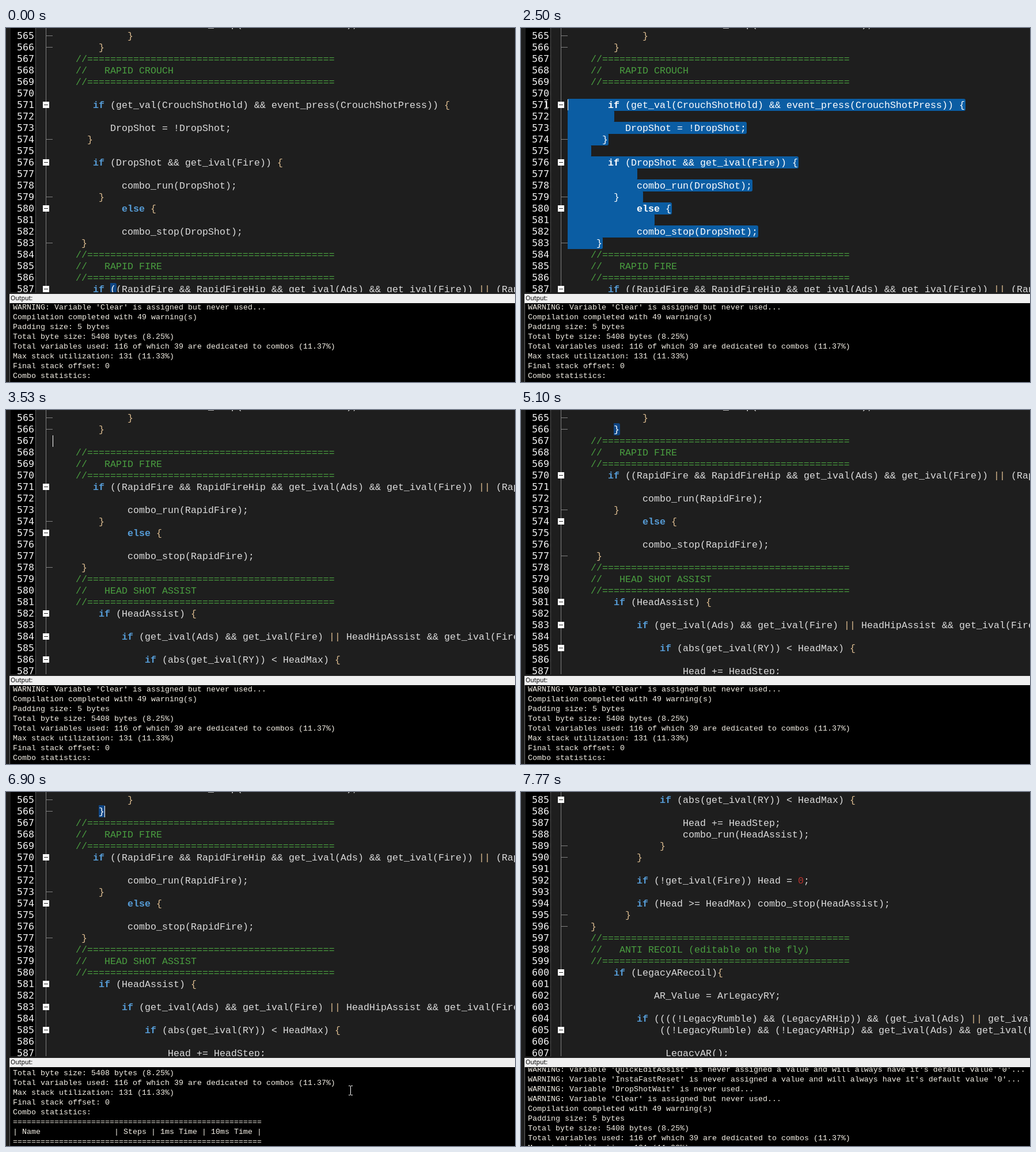
An HTML page with a canvas for the animation above (8000 ms loop, 884 by 615 pixels).

```html
<!DOCTYPE html>
<html lang="en">
<head>
<meta charset="utf-8">
<title>Code editor</title>
<style>
html, body { margin: 0; width: 100%; height: 100%; overflow: hidden; background: #1e1e1e; }
canvas { display: block; }
</style>
</head>
<body>
<canvas id="stage" width="884" height="615"></canvas>
<script>
const ctx = document.getElementById('stage').getContext('2d');
const LOOP = 8000, LEFT = 81, CHAR = 10, ROW = 20, FIRST = 564;
const CODE_FONT = '16.66px "Liberation Mono", monospace';
const RULE = '4 //' + '='.repeat(43);

// Each row: indent, then text.
const source = `22 combo_stop(HeadAssistFireMode);
13 }
8 }
${RULE}
4 //   RAPID CROUCH
${RULE}
0
7 if (get_val(CrouchShotHold) && event_press(CrouchShotPress)) {
8
10 DropShot = !DropShot;
6 }
4
7 if (DropShot && get_ival(Fire)) {
12
12 combo_run(DropShot);
8 }    
12 else {
15
12 combo_stop(DropShot);
5 }
${RULE}
4 //   RAPID FIRE
${RULE}
7 if ((RapidFire && RapidFireHip && get_ival(Ads) && get_ival(Fire)) || (RapidFire
0
13 combo_run(RapidFire);
8 }
13 else {
0
13 combo_stop(RapidFire);
5 }
${RULE}
4 //   HEAD SHOT ASSIST
${RULE}
8 if (HeadAssist) {
0
12 if (get_ival(Ads) && get_ival(Fire) || HeadHipAssist && get_ival(Fire)) {
0
16 if (abs(get_ival(RY)) < HeadMax) {
0
20 Head += HeadStep;
20 combo_run(HeadAssist);
16 }
12 }
0
12 if (!get_ival(Fire)) Head = 0;
0
12 if (Head >= HeadMax) combo_stop(HeadAssist);
10 }
4 }
${RULE}
4 //   ANTI RECOIL (editable on the fly)
${RULE}
8 if (LegacyARecoil){
0
15 AR_Value = ArLegacyRY;
0
12 if ((((!LegacyRumble) && (LegacyARHip)) && (get_ival(Ads) || get_ival(Fire))) ||
16 ((!LegacyRumble) && (!LegacyARHip) && get_ival(Ads) && get_ival(Fire))) {
0
17 LegacyAR();`;

const parseRow = line => {
  const [, indent, text] = line.match(/^(\d+) ?(.*)$/);
  return ' '.repeat(+indent) + text;
};
const before = source.split('\n').map(parseRow);
const cleared = [...before.slice(0, 3), '', ...before.slice(20)];
const joined = [...before.slice(0, 3), ...before.slice(20)];
// Rows that open a fold although their brace lies past the right edge
const opensFold = row => /\{$|\(RapidFire$/.test(row);

const output = [
  "WARNING: Variable 'QuickEditAssist' is never assigned a value and will always have it's default value '0'...",
  "WARNING: Variable 'InstaFastReset' is never assigned a value and will always have it's default value '0'...",
  "WARNING: Variable 'DropShotWait' is never used...",
  "WARNING: Variable 'Clear' is assigned but never used...",
  'Compilation completed with 49 warning(s)',
  'Padding size: 5 bytes',
  'Total byte size: 5408 bytes (8.25%)',
  'Total variables used: 116 of which 39 are dedicated to combos (11.37%)',
  'Max stack utilization: 131 (11.33%)',
  'Final stack offset: 0',
  'Combo statistics:',
  '='.repeat(54),
  '| Name'.padEnd(22) + '| Steps | 1ms Time | 10ms Time |',
  '='.repeat(54)
];

// Value of the last [time, value] step reached
const stepAt = (steps, t) => steps.reduce((value, [at, next]) => t >= at ? next : value, steps[0][1]);

const editorScroll = [[0, 0], [7170, 3], [7230, 6], [7300, 9], [7370, 12], [7700, 15], [7735, 18], [7765, 20]];
const outputScroll = [[0, 0], [5795, 24], [5828, 48], [6970, 0], [7030, -48]];
const caretShown = [[0, 0], [1640, 1], [3200, 0], [3528, 1], [4230, 0], [4770, 1], [5098, 0], [5795, 1], [6300, 0], [6830, 1]];

// Pointer strokes as [time, x, y]
const strokes = [
  [[900, 879, 284], [1250, 440, 318], [1670, 194, 391], [1780, 194, 391], [1900, 162, 377],
   [2200, 110, 270], [2500, 43, 133], [2570, 28, 93], [2640, 17, 53], [2670, 17, 53]],
  [[3800, 5, 25], [3865, 5, 25]],
  [[6330, 879, 480], [6600, 720, 512], [6890, 598, 518], [6975, 598, 518], [7100, 880, 440]]
];

function pointerAt(t) {
  for (const stroke of strokes) {
    for (let i = 1; i < stroke.length; i++) {
      const [t0, x0, y0] = stroke[i - 1], [t1, x1, y1] = stroke[i];
      if (t < t0 || t >= t1) continue;
      const k = (t - t0) / (t1 - t0);
      return [Math.round(x0 + (x1 - x0) * k), Math.round(y0 + (y1 - y0) * k)];
    }
  }
  return null;
}

function caretAt(t, rows) {
  if (t < 1900) return [20, 11];
  if (t < 2640) {
    const [x, y] = pointerAt(t);
    const row = Math.min(19, Math.floor((y - 4) / ROW) + 1);
    const col = Math.max(0, Math.round((x - LEFT) / CHAR));
    return [row, Math.min(col, rows[row].length)];
  }
  return t < 3730 ? [3, 0] : [2, 9];
}

function rect(color, x, y, w, h) {
  ctx.fillStyle = color;
  ctx.fillRect(x, y, w, h);
}

function write(text, x, y, color, font) {
  ctx.font = font;
  ctx.fillStyle = color;
  ctx.fillText(text, x, y);
}

function drawCode(row, y, selected) {
  const put = (text, col, color, weight = '') =>
    write(text, LEFT + col * CHAR, y + 5, selected ? '#ffffff' : color, weight + CODE_FONT);
  if (/^\s*\/\//.test(row)) return put(row, 0, '#4a9f40');
  for (const { 0: token, index } of row.matchAll(/\w+|[{}|]+|[^\w\s{}|]+/g)) {
    if (/^(if|else)$/.test(token)) put(token, index, '#569cd6', 'bold ');
    else if (/^\d+$/.test(token)) put(token, index, '#b8322e');
    else put(token, index, /[{}|]/.test(token) ? '#dcbc90' : '#dcdcdc');
  }
}

// Repaints columns from..to of a row on a coloured block
function highlight(row, y, from, to, color) {
  if (to <= from) return;
  ctx.save();
  ctx.beginPath();
  ctx.roundRect(LEFT + from * CHAR, y - 11, (to - from) * CHAR + 1, ROW + 1, [0, 3, 3, 0]);
  ctx.clip();
  rect(color, 0, y - 11, 884, ROW + 1);
  drawCode(row, y, true);
  ctx.restore();
}

function drawEditor(t) {
  const rows = t < 3528 ? before : t < 3730 ? cleared : joined;
  const top = stepAt(editorScroll, t) + 1;
  const [caretRow, caretCol] = caretAt(t, rows);
  const selecting = t >= 1900 && t < 3528;

  ctx.save();
  ctx.beginPath();
  ctx.rect(0, 0, 884, 459);
  ctx.clip();
  rect('#000000', 8, 0, 43, 459);
  for (let y = 0; y < 459; y += 2) rect('#8a8a8a', 51, y, 1, 1);
  rect('#808080', 69, 0, 1, 459);

  for (let i = top - 1; i <= top + 22 && i < rows.length; i++) {
    const row = rows[i], y = 14 + (i - top) * ROW;
    write(FIRST + i, 19, y + 5, '#f0f0f0', '16.6px "DejaVu Sans Mono", monospace');
    if (opensFold(row)) {
      rect('#ffffff', 64, y - 6, 11, 11);
      rect('#1e1e1e', 66, y - 1, 7, 1);
    } else if (row.trim() === '}') {
      rect('#808080', 69, y - 1, 12, 1);
    }
    drawCode(row, y);
    if (selecting && i >= caretRow && i <= 19)
      highlight(row, y, i === caretRow ? caretCol : 0, i === 19 ? 6 : row.length, '#0b5da3');
    if (t < 1640 && i === 23) highlight(row, y, 10, 11, '#0e4583');
    if (t >= 3730 && i === 2) highlight(row, y, 8, 9, '#0e4583');
    if (i === caretRow && stepAt(caretShown, t))
      rect('#ffffff', LEFT + caretCol * CHAR, y - 10, 1, ROW);
  }
  ctx.restore();
}

function drawOutput(t) {
  rect('#f0f0f0', 6, 462, 878, 16);
  write('Output:', 8, 473, '#000000', '10.5px "Noto Sans", sans-serif');
  rect('#6a6a6a', 6, 478, 1, 137);
  rect('#000000', 7, 478, 877, 137);
  ctx.save();
  ctx.beginPath();
  ctx.rect(7, 479, 877, 136);
  ctx.clip();
  const scroll = stepAt(outputScroll, t);
  output.forEach((line, i) =>
    write(line, 12, 438 + i * 17 - scroll, '#f4f0e6', '13.33px "Liberation Mono", monospace'));
  ctx.restore();
}

function drawPointer(t) {
  const at = pointerAt(t);
  if (!at) return;
  const [x, y] = at;
  rect('#ffffff', x, y - 7, 1, 15);
  for (const edge of [y - 8, y + 8]) {
    rect('#ffffff', x - 3, edge, 3, 1);
    rect('#ffffff', x + 1, edge, 3, 1);
  }
}

const start = performance.now();
function frame() {
  const t = (performance.now() - start) % LOOP;
  rect('#1e1e1e', 0, 0, 884, 615);
  drawEditor(t);
  drawOutput(t);
  drawPointer(t);
  requestAnimationFrame(frame);
}
frame();
</script>
</body>
</html>
```
